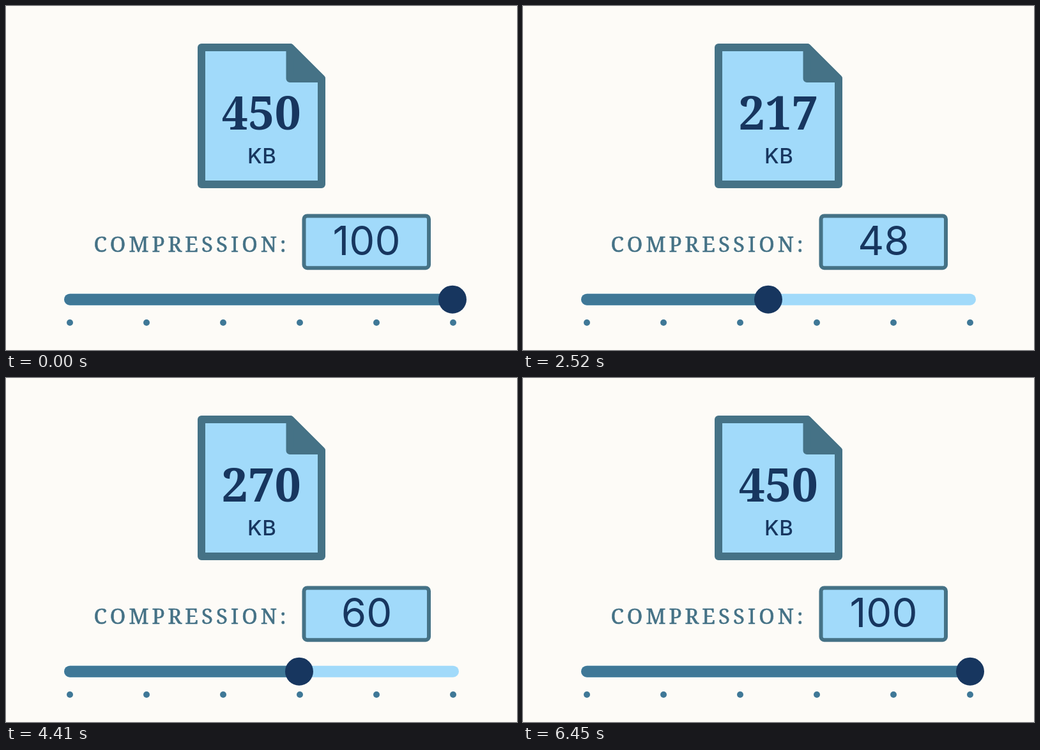
An HTML page that plays this animation: 800x540 px, repeating every 7200 ms.

```html
<!DOCTYPE html>
<html lang="en">
<head>
<meta charset="utf-8">
<title>Compression slider</title>
<style>
  html, body { margin: 0; width: 100%; height: 100%; overflow: hidden; background: #fdfbf7; }
  svg { display: block; width: 800px; height: 540px; }
  .mid { text-anchor: middle; fill: #17365f; }
  .size { font: 600 73px "Noto Serif", serif; letter-spacing: .5px; }
  .unit { font: 500 33px Inter, sans-serif; letter-spacing: .5px; }
  .level { font: 400 63.5px Inter, sans-serif; }
  .label {
    font: 500 33px "Noto Serif", serif; letter-spacing: 5.1px;
    fill: #457286; stroke: #457286; stroke-width: .6;
  }
  .track { stroke-width: 18; stroke-linecap: round; }
</style>
</head>
<body>
<svg viewBox="0 0 800 540">
  <g stroke="#457286" stroke-width="12" stroke-linejoin="round">
    <path d="M306 65H445L494 114V280H306Z" fill="#a1dafa"/>
    <path d="M444.5 65V114H494L445 65Z" fill="#457286"/>
  </g>
  <text id="size" class="mid size" x="400" y="194">450</text>
  <text class="mid unit" x="400.7" y="247">KB</text>

  <text class="label" x="137.5" y="386">COMPRESSION:</text>
  <rect x="466.5" y="329.5" width="195.5" height="81.7" rx="5" fill="#a1dafa" stroke="#457286" stroke-width="6"/>
  <text id="level" class="mid level" x="564.5" y="391">100</text>

  <g transform="translate(0 460.7)">
    <path class="track" d="M100 0H700" stroke="#a1dafa"/>
    <line id="fill" class="track" x1="100" x2="699" stroke="#3f7897"/>
    <circle id="knob" cx="699" r="22" fill="#17365f"/>
  </g>
  <g id="dots" fill="#3f7897"></g>
</svg>
<script>
  const LOOP = 7200, TICK = 30, MAX_KB = 450;
  const $ = id => document.getElementById(id);
  const size = $('size'), level = $('level'), fill = $('fill'), knob = $('knob');

  // [tick, knob position in %, displayed value]
  const steps = [
    [0, 99.83, 100],
    [24, 20, 20],
    [48, 86.6, 86.6],
    [72, 23.85, 26.5],
    [97, 73.8, 72.63],
    [147, 59.83, 60],
    [160, 59.83, 60],
    [210, 100, 100],
    [240, 100, 100]
  ];

  for (let i = 0; i < 6; i++) {
    const dot = document.createElementNS('http://www.w3.org/2000/svg', 'circle');
    dot.setAttribute('cx', 100 + i * 120);
    dot.setAttribute('cy', 497);
    dot.setAttribute('r', 5);
    $('dots').append(dot);
  }

  const ease = p => p * p * (3 - 2 * p);

  function pose(tick) {
    const next = steps.findIndex(s => s[0] > tick);
    const a = steps[next - 1], b = steps[next];
    const k = ease((tick - a[0]) / (b[0] - a[0]));
    return [1, 2].map(i => a[i] + (b[i] - a[i]) * k);
  }

  function draw(ms) {
    const [pos, value] = pose(Math.floor((ms % LOOP) / TICK));
    const x = 100 + pos * 6;
    knob.setAttribute('cx', x);
    fill.setAttribute('x2', x);
    level.textContent = Math.round(value);
    size.textContent = Math.round(value * MAX_KB / 100);
  }

  const start = performance.now();
  function loop() {
    draw(performance.now() - start);
    requestAnimationFrame(loop);
  }
  loop();
</script>
</body>
</html>
```
